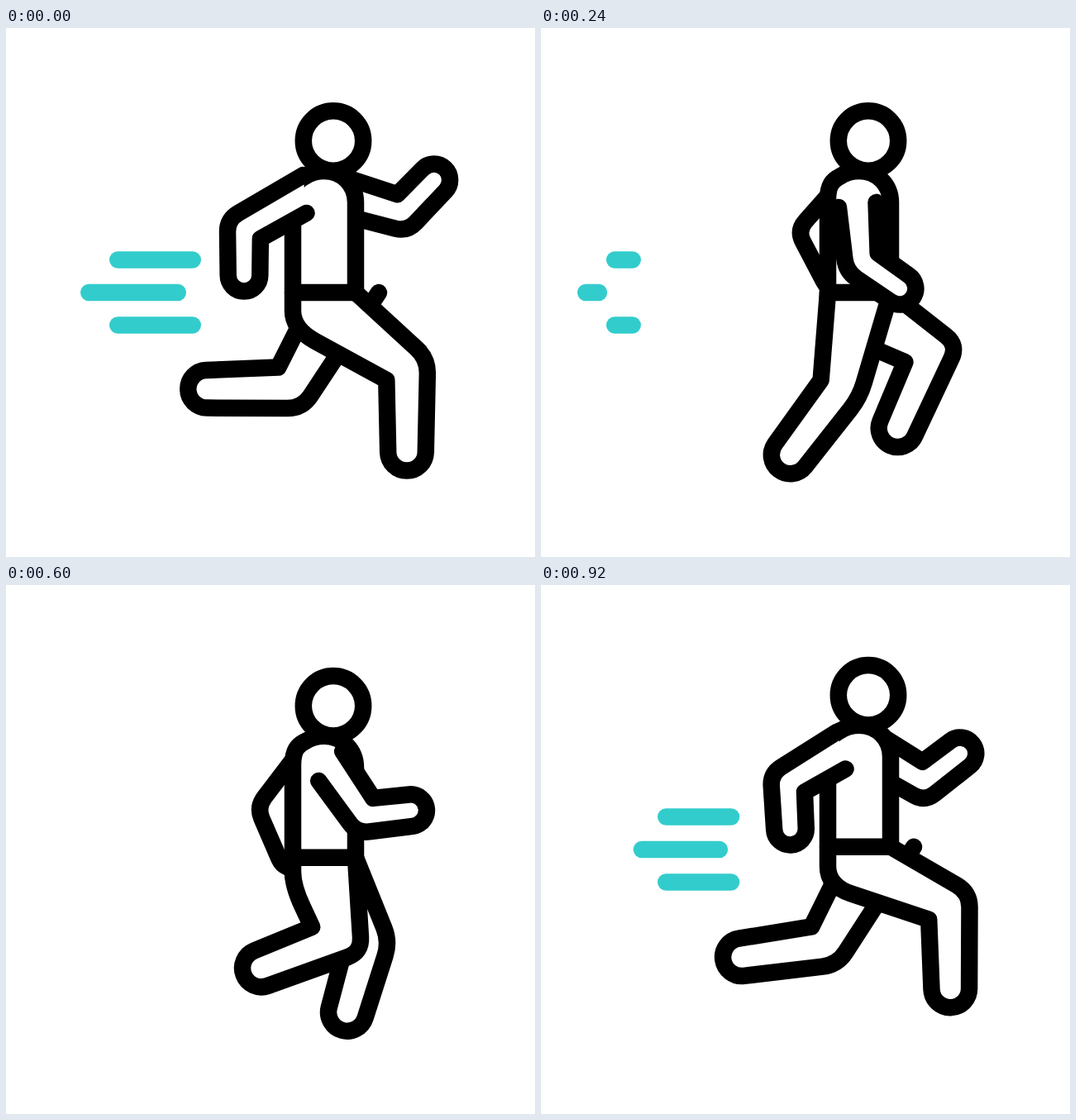
Animation of 640x640 px, one loop 0.96 s. Source, as an HTML page:

```html
<!DOCTYPE html>
<html lang="en">
<head>
<meta charset="utf-8">
<title>Runner</title>
<style>
  html, body { margin: 0; width: 100%; height: 100%; overflow: hidden; background: #fff; }
  svg { display: block; width: 100vw; height: 100vh; }
  .ink { fill: #fff; stroke: #000; stroke-width: 20.5; stroke-linecap: round; stroke-linejoin: round; }
</style>
</head>
<body>
<svg viewBox="0 0 640 640">
  <g fill="#33cccc" id="lines">
    <rect height="20.5" rx="10.25" y="270.2"/>
    <rect height="20.5" rx="10.25" y="309.8"/>
    <rect height="20.5" rx="10.25" y="349.2"/>
  </g>
  <g class="ink">
    <path id="farArm"/>
    <path id="farLeg"/>
    <path id="nearLeg"/>
    <g id="body">
      <path d="M347 320V208C347 190 353 184 361 180Q372 173 385 173C407 173 423 190 423 211V320Z"/>
      <circle cx="396" cy="136.5" r="36.2"/>
    </g>
    <path id="nearArm"/>
  </g>
</svg>
<script>
const LOOP = 960, HALF = LOOP / 2, TICK = 40, FLOOR = 517;
const LEG = { joint: 25, tip: 22.8, length: 102, side: 1, round: 18 };
const ARM = { joint: 20, tip: 19.3, length: 56, side: -1, round: 15 };
const get = id => document.getElementById(id);

// Both legs and both arms follow one cycle, half a loop apart.
// time, knee x, knee y, shin angle
const stride = [
  [0, 485, 411, 90], [80, 455, 428, 98], [160, 420, 437, 110], [240, 363, 435, 127],
  [400, 343, 437, 165], [480, 345, 435, 179], [560, 372, 436, 172],
  [640, 436, 418, 146], [720, 473, 391, 114], [880, 502, 362, 88]
];
// time, elbow x, elbow y, forearm angle
const swing = [
  [0, 288, 243, 90], [80, 306, 268, 78], [240, 388, 283, 35], [400, 446, 252, -29],
  [480, 479, 224, -46], [560, 455, 262, -17], [640, 413, 296, 4],
  [720, 334, 248, 63], [880, 309, 235, 84]
];
// time, height of the body; repeats with every step
const bounce = [[0, 0], [80, 13], [240, 0], [320, -13]];

const clamp = (v, lo, hi) => Math.max(lo, Math.min(hi, v));
const mix = (a, b, u) => a.map((v, i) => v + (b[i] - v) * u);
const polar = (p, r, g) => [p[0] + r * Math.cos(g), p[1] + r * Math.sin(g)];
const rad = deg => deg * Math.PI / 180;
const fmt = p => p[0].toFixed(2) + ' ' + p[1].toFixed(2);

// Linear interpolation in a repeating list of keys
function track(keys, time, period) {
  const t = time % period;
  const i = keys.findLastIndex(k => k[0] <= t);
  const a = keys[i], b = keys[i + 1] || [period, ...keys[0].slice(1)];
  return mix(a, b, (t - a[0]) / (b[0] - a[0])).slice(1);
}

// Normal of the line touching circles p (radius r) and q (radius s) on one side
function normal(p, r, q, s, side) {
  const g = Math.atan2(q[1] - p[1], q[0] - p[0]);
  const lean = Math.asin(clamp((r - s) / Math.hypot(q[0] - p[0], q[1] - p[1]), -1, 1));
  return g - side * (Math.PI / 2 - lean);
}

// Where the edge from the root meets the edge to the tip
function bend(root, joint, tip, kind, side) {
  const a = normal(root, 0, joint, kind.joint, side);
  const b = normal(joint, kind.joint, tip, kind.tip, side);
  return polar(joint, kind.joint / Math.cos((a - b) / 2), (a + b) / 2 +
    (Math.cos((a - b) / 2) < 0 ? 0 : 0));
}

function toward(p, q, d) {
  const len = Math.hypot(q[0] - p[0], q[1] - p[1]) || 1;
  return mix(p, q, Math.min(d / len, 0.5));
}

const corner = (a, p, b, d) =>
  `L${fmt(toward(p, a, d))}Q${fmt(p)} ${fmt(toward(p, b, d))}`;

// Outline: outer root, rounded joint, round tip, sharp inner joint, inner root
function limb(outer, inner, joint, tip, kind, seat) {
  const { side, round, tip: r } = kind;
  const a = normal(joint, kind.joint, tip, r, side);
  const b = normal(joint, kind.joint, tip, r, -side);
  const start = polar(tip, r, a), end = polar(tip, r, b);
  const knee = bend(outer, joint, tip, kind, side);
  const fold = bend(seat || inner, joint, tip, kind, -side);
  return `M${fmt(outer)}${corner(outer, knee, start, round)}L${fmt(start)}` +
    `A${r} ${r} 0 0 ${side > 0 ? 1 : 0} ${fmt(end)}L${fmt(fold)}` +
    (seat ? corner(fold, seat, inner, 30) : '') + `L${fmt(inner)}`;
}

function leg(id, time, dy, far) {
  const [x, y, angle] = track(stride, time, LOOP);
  const knee = [x, y], foot = polar(knee, LEG.length, rad(angle));
  foot[1] = Math.min(foot[1], FLOOR);
  const shift = far ? 28 * clamp((385 - x) / 40, 0, 1) : 0;
  const front = [423 + shift, 320 + dy], back = [347 + shift, 320 + dy];
  const fold = bend(back, knee, foot, LEG, -1);
  const seat = mix(back, fold, (364 - back[1]) / (fold[1] - back[1]));
  seat[0] = Math.min(347 + shift, seat[0]);
  get(id).setAttribute('d', limb(front, back, knee, foot, LEG, seat));
}

function arm(id, time, dy) {
  const [x, y, angle] = track(swing, time, LOOP);
  const elbow = [x, y], hand = polar(elbow, ARM.length, rad(angle));
  // The shoulder turns with the elbow.
  const s = clamp((x - 380) / 90, -1, 1);
  const shoulder = [381 + 19.5 * s, 214 - 13 * s * s + dy], tilt = rad(-85 * s);
  get(id).setAttribute('d',
    limb(polar(shoulder, -23, tilt), polar(shoulder, 23, tilt), elbow, hand, ARM));
}

// Left and right end of the middle and the outer speed lines
function lineEnds(t) {
  if (t <= 320) return {
    middle: [90 - 0.192 * t, 218 - 0.68 * t + 0.00044 * t * t],
    outer: [125 - 0.192 * t, 236 - 0.417 * t - 0.00026 * t * t]
  };
  const left = LOOP - t;
  return {
    middle: [90 + 0.54 * left, 218 + 0.203 * left],
    outer: [125 + 0.4 * left, 236 + 0.107 * left]
  };
}

function speedLines(t) {
  const { middle, outer } = lineEnds(t);
  get('lines').setAttribute('visibility', t > 320 && t < 640 ? 'hidden' : 'visible');
  [outer, middle, outer].forEach(([from, to], i) => {
    const bar = get('lines').children[i], left = Math.min(from, to - 20.5);
    bar.setAttribute('x', left);
    bar.setAttribute('width', Math.max(20.5, to - left));
  });
}

function draw(t) {
  const [dy] = track(bounce, t, HALF);
  get('body').setAttribute('transform', `translate(0 ${dy})`);
  arm('nearArm', t, dy);
  arm('farArm', t + HALF, dy);
  leg('nearLeg', t, dy, false);
  leg('farLeg', t + HALF, dy, true);
  speedLines(t);
}

let begin = null;
function frame(now) {
  if (begin === null) begin = now;
  const t = Math.max(0, now - begin) % LOOP;
  draw(Math.floor(t / TICK) * TICK);
  requestAnimationFrame(frame);
}
draw(0);
requestAnimationFrame(frame);
</script>
</body>
</html>
```
